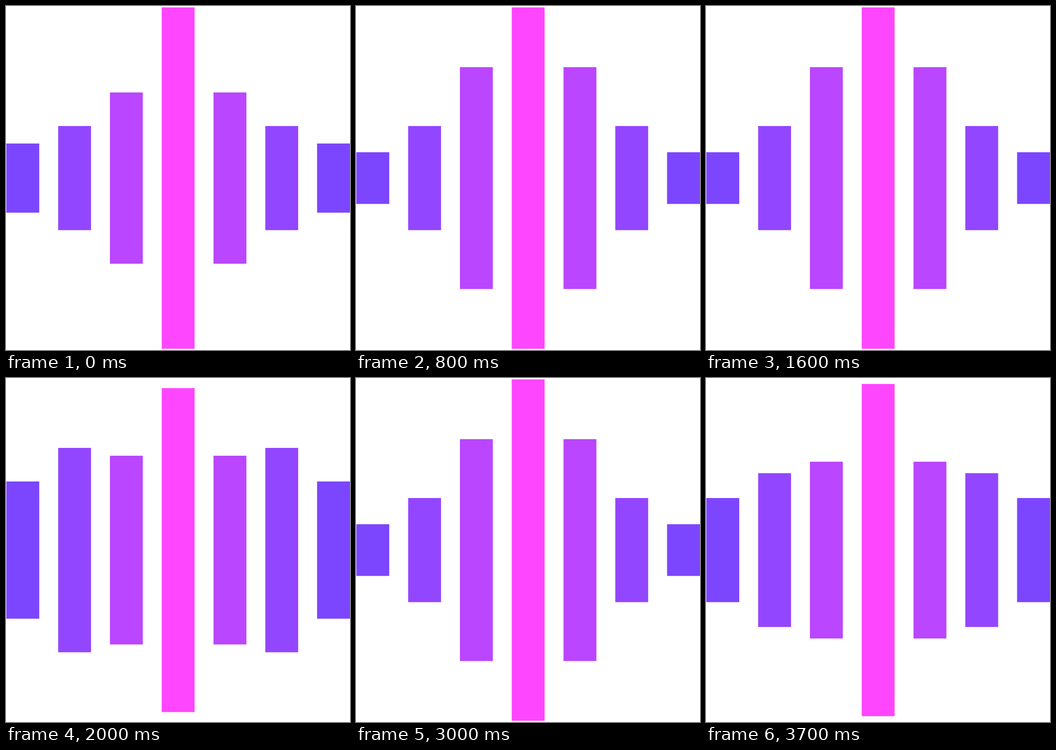
Animation of 748x748 px, one loop 3800 ms. Source, as an HTML page:

```html
<!DOCTYPE html>
<html lang="en">
<head>
<meta charset="utf-8">
<title>Sound bars</title>
<style>
  html, body { margin: 0; width: 100%; height: 100%; overflow: hidden; background: #fff; }
  svg { display: block; width: 100vw; height: 100vh; }
</style>
</head>
<body>
<svg id="stage" viewBox="0 0 748 748"></svg>
<script>
  const STEP = 100;      // ms per drawn step
  const LAST = 19;       // the wave runs 0..LAST and back again
  const PITCH = 112.6;
  const WIDTH = 71.5;
  const SPAN = 748.4;    // top + bottom of every bar

  // All lists run from the middle bar outwards.
  const colors = ['#ff46ff', '#ba46ff', '#9346ff', '#7c46ff'];
  const rest = [3, 188, 261, 299];
  const rise = [13, 182, 207, 261];
  const wide = [22, 169, 152, 225];
  const tall = [3, 133, 261, 318];

  const stage = document.getElementById('stage');
  const bars = Array.from({ length: 7 }, (_, i) => {
    const rank = Math.abs(i - 3);
    const el = document.createElementNS('http://www.w3.org/2000/svg', 'rect');
    el.setAttribute('x', 0.8 + PITCH * i);
    el.setAttribute('width', WIDTH);
    el.setAttribute('fill', colors[rank]);
    stage.append(el);
    return { el, rank };
  });

  const between = (a, b) => a.map((v, i) => (v + b[i]) / 2);

  // The forward run is itself symmetric around step 10.
  function pose(step) {
    const k = Math.min(step, 20 - step);
    if (k === 0) return rest;
    if (k === 1) return rise;
    if (k % 2) return between(wide, tall);
    return k % 4 ? wide : tall;
  }

  function draw(time) {
    const n = Math.floor(time / STEP) % (2 * LAST);
    const tops = pose(Math.min(n, 2 * LAST - n));
    for (const { el, rank } of bars) {
      el.setAttribute('y', tops[rank]);
      el.setAttribute('height', SPAN - 2 * tops[rank]);
    }
  }

  let start;
  function tick(now) {
    start ??= now;
    draw(now - start);
    requestAnimationFrame(tick);
  }
  draw(0);
  requestAnimationFrame(tick);
</script>
</body>
</html>
```
